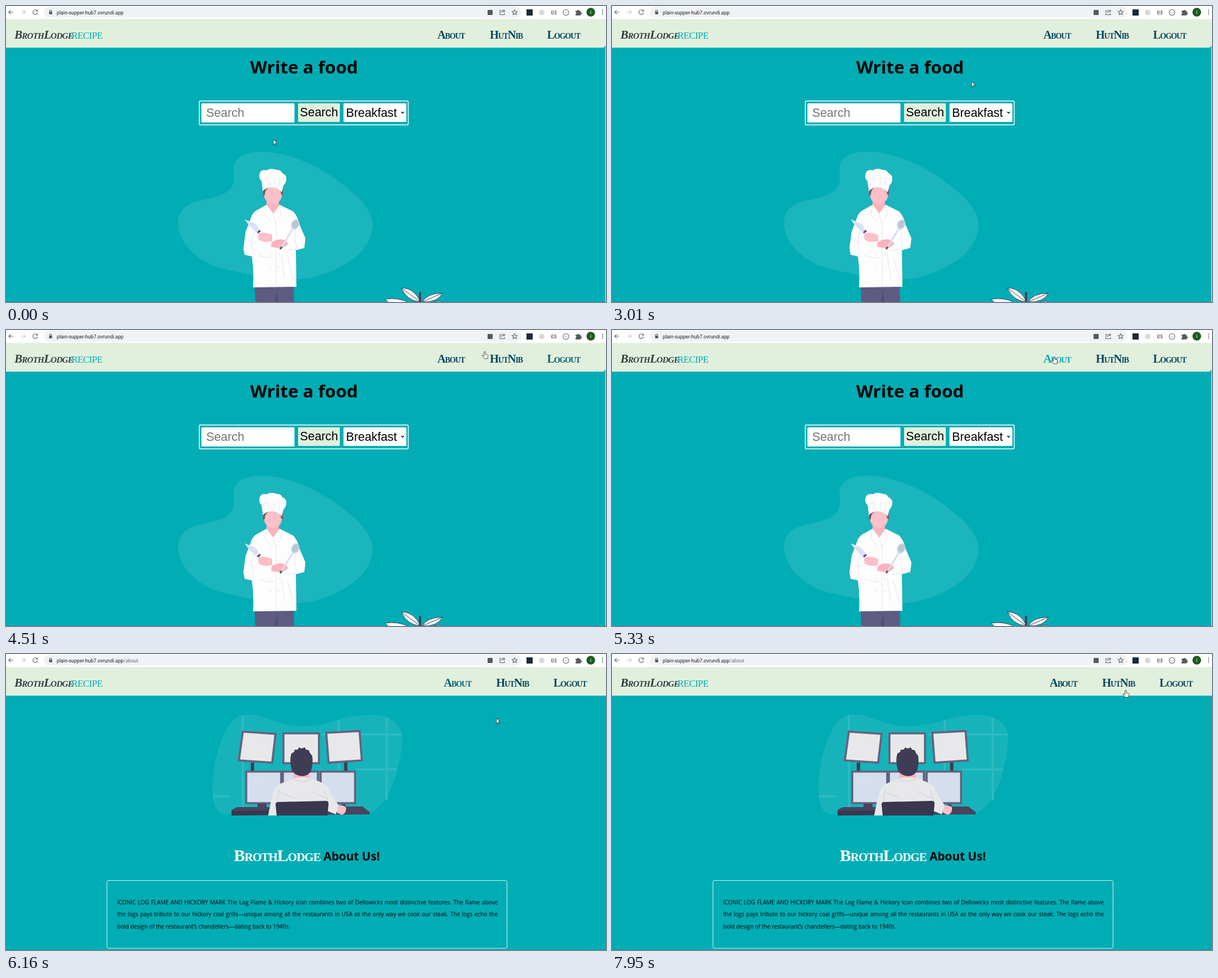
An HTML page for the animation above (8 s loop, 1064 by 526 pixels).

```html
<!DOCTYPE html>
<html lang="en">
<head>
<meta charset="utf-8">
<title>Recipe site tour</title>
<style>
  html, body { margin: 0; width: 100%; height: 100%; overflow: hidden; background: #00adb5; }
  svg { display: block; width: 1064px; height: 526px; }
  .display { font-family: "Liberation Serif", serif; font-weight: 700; font-variant: small-caps; }
  .nav { font-size: 20.5px; letter-spacing: -1.2px; fill: #0b465f; }
  .heading { font-family: "Open Sans", sans-serif; font-weight: 700; }
  .field { font: 21.33px "Liberation Sans", Arial, sans-serif; }
  .url { font: 8.8px Roboto, sans-serif; fill: #202124; }
  .story { font: 10px/21.4px "Open Sans", sans-serif; color: #000; white-space: nowrap; }
  .story div { text-align: justify; text-align-last: justify; }
  .story div:last-child { text-align-last: left; }
  .icon { fill: none; stroke: #5f6368; stroke-width: 1.1; }
  .fold { fill: none; stroke: #e3e3e8; stroke-width: .9; }
  .frame { stroke: #65617d; stroke-width: 3.6; }
</style>
</head>
<body>
<svg viewBox="0 0 1064 526" xmlns="http://www.w3.org/2000/svg">
  <rect width="1064" height="526" fill="#00adb5"/>

  <!-- browser bar -->
  <rect width="1064" height="23" fill="#fff"/>
  <rect x="67" y="1" width="847" height="20" rx="10" fill="#f0f2f4"/>
  <g class="icon">
    <path d="M13 11H5M8.5 7.3 4.8 11l3.7 3.7"/>
    <path d="M26 11h8M30.5 7.3l3.7 3.7-3.7 3.7" stroke="#c4c7cb"/>
    <path d="M55.2 8.3A4.2 4.2 0 1 0 56 12M56 6.3v3h-3"/>
    <path d="M77.3 10.5V9a1.8 1.8 0 0 1 3.6 0v1.5"/>
    <path d="M880 8h-4v7.500h8v-3M879 12.500q.5-4 4.500-4M882 6.500l2.500 2-2.500 2"/>
    <path d="m902 6.500 1.400 3 3.200.4-2.400 2.200.7 3.200-2.900-1.600-2.900 1.600.7-3.200-2.400-2.200 3.200-.4z"/>
    <path d="M969 7.500q-2.500 4 0 8M974 7.500q2.500 4 0 8M970 10h3M970 13h3" stroke="#333"/>
    <circle cx="993" cy="11.500" r="5"/>
    <path d="M991 11.500h1M994 11.500h1" stroke-width="1.6"/>
  </g>
  <g fill="#55595e">
    <rect x="76.500" y="10" width="5.300" height="4.700" rx=".6"/>
    <rect x="854" y="7" width="9" height="9" rx="1"/>
    <path d="M1010 8.500h3a1.700 1.700 0 1 1 3.400 0h2.600v3a1.700 1.700 0 1 1 0 3.200v2h-9v-3a1.500 1.500 0 0 0 0-3z"/>
    <circle cx="1058" cy="7.500" r="1"/><circle cx="1058" cy="11" r="1"/><circle cx="1058" cy="14.500" r="1"/>
  </g>
  <rect x="923" y="6" width="11" height="11" fill="#1d2b38"/>
  <circle cx="950" cy="11.500" r="5" fill="#d9dadc"/>
  <circle cx="1037" cy="11" r="7.700" fill="#1f5b1f"/>
  <text x="1037" y="14" text-anchor="middle" font-family="Roboto, sans-serif" font-size="8.500" fill="#fff">i</text>
  <text class="url" x="90" y="14.500">plain-supper-hub7.ovrundi.app<tspan id="route" fill="#6b6f74">/about</tspan></text>

  <!-- site header -->
  <path id="bar" fill="#e1f0dd"/>
  <text class="display" x="15" y="58" font-size="21" font-style="italic" letter-spacing="-.7" fill="#353c41">BrothLodge</text>
  <text class="display" x="116" y="58" style="font-weight:400" font-size="24" letter-spacing="-.6" fill="#00adb5">recipe</text>
  <g id="nav" class="display nav">
    <text x="765" y="58">About</text>
    <text x="858" y="58">HutNib</text>
    <text x="959.500" y="58">Logout</text>
  </g>

  <g id="home">
    <rect x="1063" y="23" width="1" height="503" fill="#e4f3f3"/>
    <text class="heading" x="433" y="120" font-size="31.200">Write a food</text>
    <rect x="342.700" y="168.700" width="370.600" height="42.600" rx="2" fill="none" stroke="#fff" stroke-width="1.400"/>
    <rect x="346.500" y="173" width="165" height="34" rx="1.500" fill="#fff"/>
    <rect x="518" y="173" width="74" height="33" rx="1.500" fill="#e1f0dd"/>
    <rect x="598.500" y="173" width="111.500" height="33" rx="1.500" fill="#fff"/>
    <g class="field">
      <text x="355" y="196.500" fill="#757575">Search</text>
      <text x="521.300" y="196">Search</text>
      <text x="603" y="196.500">Breakfast</text>
    </g>
    <path d="m701 188 2.300 2.500 2.300-2.500" fill="none" stroke="#000" stroke-width="1.300"/>

    <path fill="#1bb5bd" d="M404 300C400 272 418 258 455 259C510 260 568 292 606 324C636 348 652 372 650 392C646 436 604 465 545 482C500 492 430 478 378 465C334 450 304 418 305 383C307 358 326 349 352 344C390 337 407 326 404 300Z"/>

    <!-- chef -->
    <path d="M441 497h69l1 29h-69z" fill="#5d5b80"/>
    <path d="M477 526l3-20 3 20z" fill="#504e70"/>
    <path d="M462 340h22v20l5 6-14 13-15-13 2-6z" fill="#f9b4be"/>
    <ellipse cx="473.500" cy="335" rx="16" ry="17" fill="#fdbfc8"/>
    <path d="M456 337q-1-10 3-16l31 1q2 7 1 14l-3-1q-1-9-8-13-12-2-17 3-4 4-4 11z" fill="#7c5660"/>
    <path d="M455 324l-2-13q-6-5-3-14 3-7 12-5 8-5 17-1 9 0 11 6 8 3 7 12-1 6-5 10l-3 12q-8-9-18-9-10 1-16 7z" fill="#fdfdfe"/>
    <path class="fold" d="M456 312l2 9M465 306l1 13M476 305l0 13M486 308l-2 13M453 311q7-4 13-4M481 306q8-1 13 2"/>
    <path d="M462 353l12 16 11-16 24 12q8 8 11 22l11 26-2 17-15 4 1 65-77 1q2-28-2-55l-13-3-2-12 4-29 11-29q4-8 14-12z" fill="#fdfdfe"/>
    <path class="fold" d="M474 369l5 22v106M440 397l-4 20 3 24M514 383l-2 30 4 18M462 354l-3 16 12 15M485 354l3 17-10 14M488 441l6 42M499 446l11 40M430 417l13 4M448 443q12 5 26 4M497 434l18-2"/>
    <g fill="#d9d9df">
      <circle cx="469" cy="442" r="1"/><circle cx="484" cy="442" r="1"/>
      <circle cx="469" cy="464" r="1"/><circle cx="484" cy="464" r="1"/>
    </g>
    <path d="M449 403q14-1 23 4v11q-14 3-23-2-4-7 0-13z" fill="#fdbfc8"/>
    <path d="M471 420q8-6 20-5 8 2 9 8-7 8-17 7l-13-2z" fill="#fbb2bd"/>
    <path d="M423 379l20 8 9 14-5 3q-13-9-24-25z" fill="#dbe2f5"/>
    <path d="M446 403l5-4M486 432l4-5" stroke="#53516f" stroke-width="3"/>
    <path d="M489 428l20-33" stroke="#d6def1" stroke-width="3"/>
    <ellipse cx="513" cy="388" rx="7" ry="9" transform="rotate(25 513 388)" fill="#c6d0df"/>
    <ellipse cx="513" cy="388" rx="4.500" ry="6.500" transform="rotate(25 513 388)" fill="#b8c5d4"/>

    <!-- plant -->
    <g fill="#fff" stroke="#3f3d56" stroke-width="1">
      <path d="M735 526q-24-2-34-25 23 0 34 25z"/>
      <path d="M738 526q8-15 36-16-8 17-36 16z"/>
      <path d="M672 521q24-4 44 7h-36z"/>
      <path d="M774 525q-13-1-20 3h16z"/>
      <path d="M701 501l34 25M774 510l-36 16" fill="none"/>
    </g>
    <rect x="732.500" y="508" width="3.500" height="18" fill="#3f3d56"/>
  </g>

  <g id="about">
    <g id="picture">
      <path fill="#17b3bb" d="M366 246C366 196 382 128 412 111C442 98 472 124 514 128C566 132 590 110 645 108C686 106 704 130 703 154C698 198 688 248 658 275Q648 284 630 285H388Q368 282 366 246Z"/>
      <path d="M560 143H702M590 117V285M675 113V260M367 253H398M420 109V285M620 205H693" stroke="#2fbbc3" stroke-width="3.500"/>
      <path d="M437 193v16M602.500 190v18" stroke="#3f3d56" stroke-width="6"/>
      <g class="frame" fill="#e8e8ea">
        <path d="M420 138l58 4-6 51-59-4z"/>
        <path d="M492 141h63v53h-63z"/>
        <path d="M568 140l59-3 4 52-59 4z"/>
      </g>
      <g class="frame" fill="#d4deed">
        <path d="M426 209h62v56h-62z"/>
        <path d="M491 209h62v56h-62z"/>
        <path d="M558 209h61v56h-61z"/>
      </g>
      <path d="M432 219h30M432 223h22M432 227h28" stroke="#e6e4e3"/>
      <path d="M400 277l10-5h36v-6h16v6h133v-5h7v4h30l13 10v4l-245 2z" fill="#47445c"/>
      <path d="M400 279l65-1v8l-65 1z" fill="#393750"/>
      <path d="M586 270q12-3 17 3 1 9-7 13l-9-4z" fill="#fdbfc8"/>
      <path d="M511 208h26l3 18h-31z" fill="#f5b3b7"/>
      <path d="M465 287q5-28 10-44 4-10 17-15l17-7q14-4 34 0l18 8q10 5 14 17l15 23-5 16-20-8v9z" fill="#e8e8ea"/>
      <path d="M507 222q16 9 35 0M486 246l25 10M543 245l26 12M481 263l4-23M571 263l-6-21" fill="none" stroke="#cfcfd5"/>
      <path d="M480 287l-2-20q0-4 5-4l84-2q5 0 5 5l-2 21z" fill="#39374f"/>
      <path d="M507 207q-5-17-1-30l5-3 1-4 5 0 3-4 4 2 6-2 2 4 5 1 2 5 4 5q2 13-2 27-7 10-17 9-12-1-17-10z" fill="#3f3d56"/>
    </g>
    <g id="copy">
      <text class="display" x="404" y="367.500" font-size="30" letter-spacing="-1" fill="#fff">BrothLodge</text>
      <text class="heading" x="563" y="367" font-size="20.700">About Us!</text>
      <rect x="179" y="402.500" width="709.500" height="120.500" rx="3" fill="none" stroke="#d8f2f3"/>
      <foreignObject x="197" y="430.800" width="675" height="70">
        <div class="story" xmlns="http://www.w3.org/1999/xhtml">
          <div>ICONIC LOG FLAME AND HICKORY MARK The Log Flame &amp; Hickory icon combines two of Dellowicks most distinctive features. The flame above</div>
          <div>the logs pays tribute to our hickory coal grills—unique among all the restaurants in USA as the only way we cook our steak. The logs echo the</div>
          <div>bold design of the restaurant’s chandeliers—dating back to 1940s.</div>
        </div>
      </foreignObject>
    </g>
  </g>

  <g id="cursor" fill="#fff" stroke="#222" stroke-width=".8" stroke-linejoin="round">
    <path id="arrow" d="M0 0v9.500l2.200-2 1.600 3.500 1.400-.6L3.700 7h3z"/>
    <path id="hand" d="M-1.200 1q1.200-2 2.400 0v4l3.400.8q1.300.5 1.200 2l-.8 5.200H-.8l-3.700-5q-.3-1.800 1.500-1l1.800 1.300z"/>
  </g>
</svg>
<script>
const LOOP = 8000, STEP = 70, FADE = 500;
const PAGE_AT = 5530, PICTURE_AT = 5880;

// pointer path: time, x, y
const path = [
  [0, 474, 237], [140, 440, 228], [420, 160, 178], [630, 40, 60], [770, 6, 4],
  [910, 24, 9], [1120, 200, 8], [1330, 204, 72], [1540, 132, 56], [1680, 130, 56],
  [1820, 180, 70], [2450, 450, 113], [2590, 475, 118], [3010, 637.5, 134],
  [3290, 760, 132], [3430, 765, 119], [3990, 910, 48], [4130, 952, 42],
  [4270, 990, 46], [4410, 940, 52], [4480, 849, 38], [4760, 800, 60],
  [4970, 784, 47], [5740, 784, 47], [5880, 800, 62], [6160, 869.5, 114],
  [6440, 898, 140], [6650, 870, 175], [6930, 480, 480], [7070, 466, 470],
  [7420, 945, 190], [7560, 940, 162], [7910, 911, 64], [8000, 911, 64]
];
const handTimes = [[1470, 1800], [3990, 5810], [7840, LOOP]];
// link index, enter, leave
const hovers = [[2, 4200, 4410], [0, 4830, 5810]];

const get = id => document.getElementById(id);
const clamp = v => Math.min(1, Math.max(0, v));
const show = (id, on) => get(id).style.display = on ? '' : 'none';
const links = [...get('nav').children];
const DARK = [11, 70, 95], TEAL = [0, 173, 181];

function pointAt(t) {
  const i = Math.max(1, path.findIndex(p => p[0] >= t));
  const [a, b] = [path[i - 1], path[i]];
  const k = (t - a[0]) / (b[0] - a[0]);
  return [1, 2].map(n => a[n] + (b[n] - a[n]) * k);
}

function glow(t, link) {
  const hit = hovers.find(h => h[0] === link);
  if (!hit) return 0;
  const peak = clamp((Math.min(t, hit[2]) - hit[1]) / FADE);
  return Math.max(0, peak - clamp((t - hit[2]) / FADE));
}

function draw(t) {
  const onAbout = t >= PAGE_AT, loaded = t >= PICTURE_AT;
  show('home', !onAbout);
  show('about', onAbout);
  show('route', onAbout);
  show('picture', loaded);
  get('copy').setAttribute('transform', `translate(0 ${loaded ? 0 : -89.5})`);
  get('nav').setAttribute('transform', `translate(${onAbout ? 11.3 : 0} 0)`);
  get('bar').setAttribute('d', onAbout ? 'M0 23h1064v51H0z' : 'M0 23h1063v45q0 6-6 6H0z');
  links.forEach((el, i) => {
    const k = glow(t, i);
    el.style.fill = `rgb(${DARK.map((c, n) => Math.round(c + (TEAL[n] - c) * k))})`;
  });

  const [x, y] = pointAt(t);
  const hand = handTimes.some(([a, b]) => t >= a && t < b);
  get('cursor').setAttribute('transform', `translate(${x} ${y})`);
  show('hand', hand);
  show('arrow', !hand);
}

const start = performance.now();
function tick() {
  const t = (performance.now() - start) % LOOP;
  draw(Math.floor(t / STEP) * STEP);
  requestAnimationFrame(tick);
}
tick();
</script>
</body>
</html>
```
